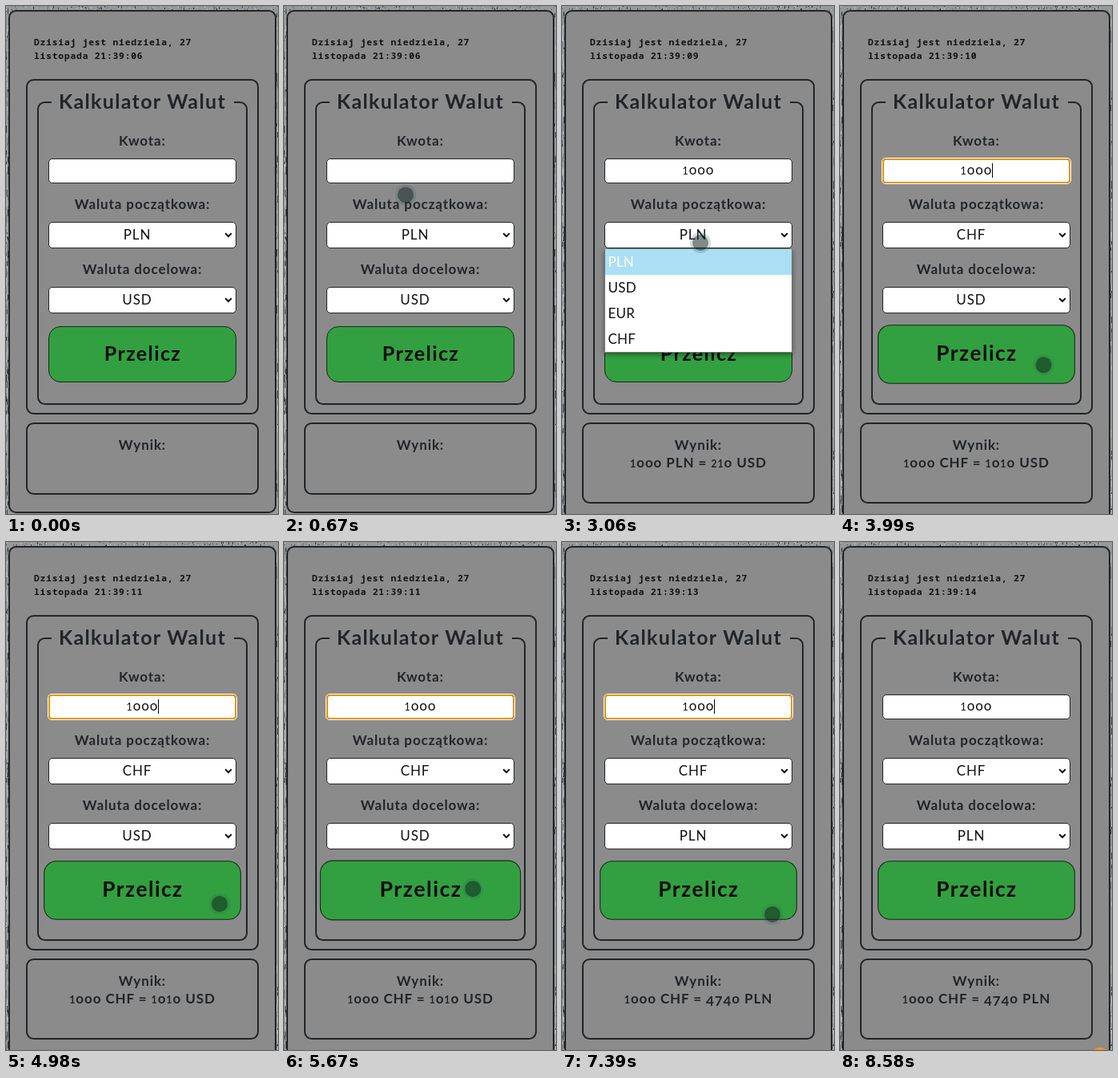
Recreate the animation shown at these times as an HTML page. Size 340x633 px, loop 8.64 s.

```html
<!DOCTYPE html>
<html lang="pl">
<head>
<meta charset="utf-8">
<title>Kalkulator Walut</title>
<style>
  html, body { margin: 0; width: 100%; height: 100%; overflow: hidden; background: #8b8b8b; }
  svg { display: block; width: 340px; height: 633px; }
  text { font-family: Lato, "Open Sans", sans-serif; fill: #212529; }
  .mid { text-anchor: middle; }
  .label { font-size: 17px; font-weight: 700; letter-spacing: .9px; }
  .title { font-size: 25px; font-weight: 700; letter-spacing: 1.35px; }
  .go { font-size: 25px; font-weight: 700; letter-spacing: 1.4px; fill: #0a0d0a; }
  .value { font-size: 17px; font-weight: 400; letter-spacing: .9px; fill: #111; }
  .item { font-size: 17px; font-weight: 400; letter-spacing: .2px; fill: #111; }
  .clock { font: 600 11.3px "Noto Sans Mono", "DejaVu Sans Mono", monospace; letter-spacing: .8px; fill: #111; }
  .frame { fill: none; stroke: #212529; stroke-width: 2; }
  .field { fill: #fff; stroke: #212529; }
  .menu { filter: drop-shadow(0 2px 3px rgba(0, 0, 0, .45)); }
</style>
</head>
<body>
<svg viewBox="0 0 340 633">
  <rect width="340" height="633" fill="#959999"/>
  <g fill="none">
    <path id="dark" stroke="#3a3f42"/>
    <path id="grey" stroke="#70767a"/>
    <path id="light" stroke="#b2b7b7"/>
  </g>
  <rect id="panel" x="4" y="6" width="333" rx="8.5" fill="#8b8b8b" stroke="#212529" stroke-width="2"/>
  <text class="clock" x="35" y="49">Dzisiaj jest niedziela, 27</text>
  <text class="clock" id="clock" x="35" y="66"></text>

  <rect class="frame" x="26" y="92" width="289" height="416" rx="8.5"/>
  <rect class="frame" x="40" y="120" width="261" height="376" rx="8.5"/>
  <rect x="57" y="117" width="228" height="6" fill="#8b8b8b"/>
  <text class="title mid" x="170.5" y="128">Kalkulator Walut</text>
  <text class="label mid" x="170.5" y="174">Kwota:</text>
  <text class="label mid" x="170.5" y="253">Waluta początkowa:</text>
  <text class="label mid" x="170.5" y="334">Waluta docelowa:</text>

  <rect class="field" x="53.5" y="190.5" width="234" height="30" rx="4.5"/>
  <g id="ring" fill="none">
    <rect x="52.5" y="189.5" width="236" height="32" rx="4.5" stroke="#fff"/>
    <rect x="54" y="191" width="233" height="29" rx="3.5" stroke="#e59700" stroke-width="2"/>
  </g>
  <text class="value mid" id="amount" x="170.5" y="210"></text>
  <rect id="caret" y="196" width="1" height="18"/>

  <rect class="field" x="53.5" y="269.5" width="234" height="32" rx="4.5"/>
  <text class="value mid" id="from" x="164" y="291"></text>
  <rect class="field" x="53.5" y="350.5" width="234" height="32" rx="4.5"/>
  <text class="value mid" id="to" x="164" y="372"></text>
  <path d="M274.2 283.3l3.8 3.8 3.8-3.8M274.2 364.3l3.8 3.8 3.8-3.8" fill="none" stroke="#000" stroke-width="2"/>

  <g id="button">
    <rect x="53.5" y="399.5" width="234" height="69" rx="14.5" fill="#32a040" stroke="#16281a"/>
    <text class="go mid" x="171" y="441.5">Przelicz</text>
  </g>

  <rect class="frame" id="box" x="26" y="520" width="289" rx="8.5"/>
  <text class="label mid" x="170.5" y="553">Wynik:</text>
  <text class="label mid" id="result" x="170.5" y="575"></text>

  <g id="menu">
    <rect class="menu" x="53.5" y=".5" width="234" height="128" fill="#fff" stroke="#777"/>
    <rect id="active" x="54" width="233" height="32" fill="#abdff5"/>
  </g>

  <g id="touch">
    <circle r="13" fill="#2c5a5a" fill-opacity=".2"/>
    <circle r="10" fill="#060c0c" fill-opacity=".4"/>
  </g>
  <g id="arrow">
    <circle cx=".7" r="13" fill="#dfe650" fill-opacity=".75"/>
    <path d="M.5 0V15.5L4 12.2 6.7 18.3 9.2 17.2 6.6 11.4H11.5Z" fill="#fff" stroke="#111"/>
  </g>
  <circle id="click" cx="325" cy="643" r="13" fill="#f0941e"/>
</svg>
<script>
const LOOP = 8640;
const CODES = ["PLN", "USD", "EUR", "CHF"];
const $ = id => document.getElementById(id);
const set = (id, attrs) => { for (const k in attrs) $(id).setAttribute(k, attrs[k]); };
const show = (id, on) => set(id, { visibility: on ? "visible" : "hidden" });
const within = (t, spans) => spans.some(([a, b]) => t >= a && t < b);
const svgNode = name => document.createElementNS("http://www.w3.org/2000/svg", name);
const ease = p => p * p * (3 - 2 * p);

// Last entry whose time has been reached.
const step = (t, keys) => keys.filter(k => k[0] <= t).pop();

// Interpolates rows of [time, ...values].
function track(t, keys, curve = p => p) {
  const i = keys.findIndex(k => k[0] > t);
  if (i === 0) return keys[0].slice(1);
  if (i < 0) return keys[keys.length - 1].slice(1);
  const a = keys[i - 1], b = keys[i];
  const p = curve((t - a[0]) / (b[0] - a[0]));
  return a.slice(1).map((v, k) => v + (b[k + 1] - v) * p);
}

const AMOUNT = [[0, ""], [1060, "1"], [1320, "10"], [1530, "100"], [1930, "1000"]];
const RESULT = [[0, ""], [2350, "1000 PLN = 210 USD"], [3780, "1000 CHF = 1010 USD"], [6950, "1000 CHF = 4740 PLN"]];
const FOCUS = [[860, 2990], [3780, 6060], [6950, 8580]];
const CARET = [0, 860, 1060, 1320, 1530, 1930, 3780, 6950].map(t => [t]);
const MENUS = [
  { open: 2990, close: 3560, top: 303, pick: 0 },
  { open: 6060, close: 6450, top: 384, pick: 1 }
];
const SCALE = [[0, 1], [3720, 1], [3860, 1.05], [5640, 1.05], [5720, 1.1], [5800, 1.05],
  [6060, 1.05], [6150, 1], [6880, 1], [7000, 1.05]];
const POINTER = [[70, 319, 584], [800, 137, 204], [2300, 140, 212], [2790, 173, 293], [3090, 173, 295],
  [3480, 95, 414], [3720, 236, 442], [4200, 267, 451], [5100, 267, 451], [5700, 236, 432],
  [5960, 180, 368], [6060, 170, 368], [6300, 70, 397], [6450, 70, 397], [6900, 258, 460],
  [7100, 263, 464], [7450, 263, 464], [8180, 299, 647]];
const POINTER_ON = [[70, 930], [2300, 8200]];

// Old-style figures: 0, 1 and 2 at x-height (a round low zero), 4 and 7 hang below the line.
function writeFigures(id, text) {
  const el = $(id);
  if (el.getAttribute("aria-label") === text) return;
  el.setAttribute("aria-label", text);
  el.textContent = "";
  let drop = 0;
  for (const ch of text) {
    const span = svgNode("tspan"), y = "47".includes(ch) ? 3 : 0;
    span.textContent = ch === "0" ? "o" : ch;
    if ("12".includes(ch)) span.setAttribute("font-size", "12.5");
    if (y !== drop) span.setAttribute("dy", y - drop);
    drop = y;
    el.append(span);
  }
}

function write(id, text) {
  if ($(id).textContent !== text) $(id).textContent = text;
}

const items = CODES.map((code, i) => {
  const item = svgNode("text");
  item.textContent = code;
  item.setAttribute("class", "item");
  item.setAttribute("x", 57.5);
  item.setAttribute("y", 22 + 32 * i);
  $("menu").append(item);
  return item;
});

// Coarse engraving-like marks around the panel.
function drawBackdrop(seed) {
  const random = () => (seed = (seed * 16807) % 2147483647) / 2147483647;
  const paths = { dark: "", grey: "", light: "" }, names = Object.keys(paths);
  const pick = () => names[Math.floor(random() * 3)];
  for (let i = 0; i < 130; i++) {
    const x = Math.floor(random() * 340) + .5, y = Math.floor(random() * 5);
    paths[pick()] += `M${x} ${y}v${1 + Math.floor(random() * 3)}`;
  }
  for (let i = 0; i < 200; i++) {
    const x = (random() < .65 ? 0 : 337) + Math.floor(random() * 3) + .5;
    paths[pick()] += `M${x} ${Math.floor(random() * 633)}v${2 + Math.floor(random() * 10)}`;
  }
  for (const name of names) set(name, { d: paths[name] });
}

let backdrop;

function draw(t) {
  const grown = t >= 2350;
  if (backdrop !== grown) drawBackdrop((backdrop = grown) ? 7919 : 4711);
  set("panel", { height: grown ? 636 : 625 });
  set("box", { height: grown ? 99 : 88 });

  const sec = 6 + Math.floor((t + 210) / 1000);
  write("clock", "listopada 21:39:" + String(sec).padStart(2, "0"));
  writeFigures("amount", step(t, AMOUNT)[1]);
  writeFigures("result", step(t, RESULT)[1]);
  write("from", t < 3560 ? "PLN" : "CHF");
  write("to", t < 6450 ? "USD" : "PLN");

  const focus = within(t, FOCUS);
  show("ring", focus);
  show("caret", focus && (t - step(t, CARET)[0]) % 1000 < 500);
  set("caret", { x: Math.round(170 + $("amount").getComputedTextLength() / 2) });

  const [scale] = track(t, SCALE);
  set("button", { transform: `translate(170.5 434) scale(${scale}) translate(-170.5 -434)` });

  const [x, y] = track(t, POINTER, ease);
  const menu = MENUS.find(m => t >= m.open && t < m.close);
  const overMenu = !!menu && y >= menu.top;
  $("menu").style.display = menu ? "" : "none";
  if (menu) {
    const row = overMenu ? Math.min(3, Math.floor((y - menu.top) / 32)) : menu.pick;
    set("menu", { transform: `translate(0 ${menu.top})` });
    set("active", { y: row * 32 });
    items.forEach((item, i) => { item.style.fill = i === row ? "#fff" : "#111"; });
  }

  const visible = within(t, POINTER_ON);
  show("touch", visible && !overMenu);
  show("arrow", visible && overMenu);
  for (const id of ["touch", "arrow"]) set(id, { transform: `translate(${x} ${y})` });
  show("click", t >= 8580);
}

const start = performance.now();
function tick() {
  draw((performance.now() - start) % LOOP);
  requestAnimationFrame(tick);
}
tick();
</script>
</body>
</html>
```
